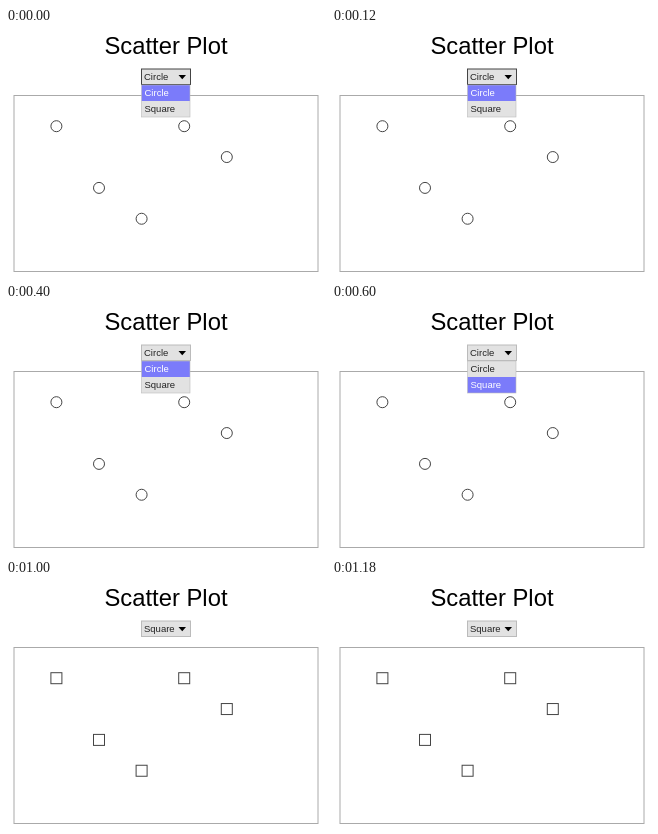
Recreate the animation shown at these times as an HTML page. Size 320 by 248 pixels, loop 1.3 s.

```html
<!DOCTYPE html>
<html lang="en">
<head>
<meta charset="utf-8">
<title>Scatter Plot</title>
<style>
  html, body { margin: 0; width: 100%; height: 100%; overflow: hidden; background: #fff; }
  svg { display: block; width: 320px; height: 248px; }
  text { font: 9.5px "Liberation Sans", Arial, sans-serif; fill: #222; }
  .title { font-size: 23.8px; fill: #000; text-anchor: middle; }
  .mark { fill: #fff; stroke: #444; stroke-width: 1; }
</style>
</head>
<body>
<svg viewBox="0 0 320 248">
  <rect width="320" height="248" fill="#fff"/>
  <text class="title" x="160" y="26">Scatter Plot</text>
  <rect x="8" y="67.5" width="304" height="176" fill="#fff" stroke="#aaa"/>
  <g id="marks"></g>
  <rect id="button" x="135.5" y="41" width="49" height="15.5" fill="#e2e2e2"/>
  <text id="choice" x="138" y="52"></text>
  <path d="M172.5 47 H180 L176.25 51.3 Z" fill="#000"/>
  <g id="menu"></g>
</svg>
<script>
  const LOOP = 1300;
  const OPTIONS = ["Circle", "Square"];
  const POINTS = [[0, 0], [1, 2], [2, 3], [3, 0], [4, 1]];
  const RADIUS = 5.5;

  const byId = id => document.getElementById(id);

  function add(parent, tag, attrs, text = "") {
    const node = document.createElementNS("http://www.w3.org/2000/svg", tag);
    set(node, attrs);
    node.textContent = text;
    return parent.appendChild(node);
  }

  function set(node, attrs) {
    for (const key in attrs) node.setAttribute(key, attrs[key]);
  }

  const marks = POINTS.map(([column, row]) => add(byId("marks"), "rect", {
    class: "mark",
    x: 50.4 + 42.6 * column - RADIUS,
    y: 98.2 + 30.85 * row - RADIUS,
    width: 2 * RADIUS,
    height: 2 * RADIUS
  }));

  const menu = byId("menu");
  const items = OPTIONS.map((name, i) => ({
    box: add(menu, "rect", { x: 135.5, y: 57 + 16 * i, width: 48.5, height: 16 }),
    label: add(menu, "text", { x: 138.5, y: 68 + 16 * i }, name)
  }));
  add(menu, "rect", { x: 135.5, y: 57, width: 48.5, height: 32, fill: "none", stroke: "#bbb", "stroke-width": 0.6 });

  function render(time) {
    const t = time % LOOP;
    const open = t < 1000;
    const hovered = t < 600 ? 0 : 1;

    byId("choice").textContent = OPTIONS[open ? 0 : 1];
    set(byId("button"), { stroke: t < 400 ? "#444" : "#bbb" });
    set(menu, { visibility: open ? "visible" : "hidden" });
    items.forEach(({ box, label }, i) => {
      const active = i === hovered;
      set(box, { fill: active ? "#7b7bfa" : "#e2e2e2" });
      set(label, { style: active ? "fill:#fff" : "" });
    });
    marks.forEach(mark => set(mark, { rx: open ? RADIUS : 0 }));
  }

  const start = performance.now();
  function tick() {
    render(performance.now() - start);
    requestAnimationFrame(tick);
  }
  tick();
</script>
</body>
</html>
```
